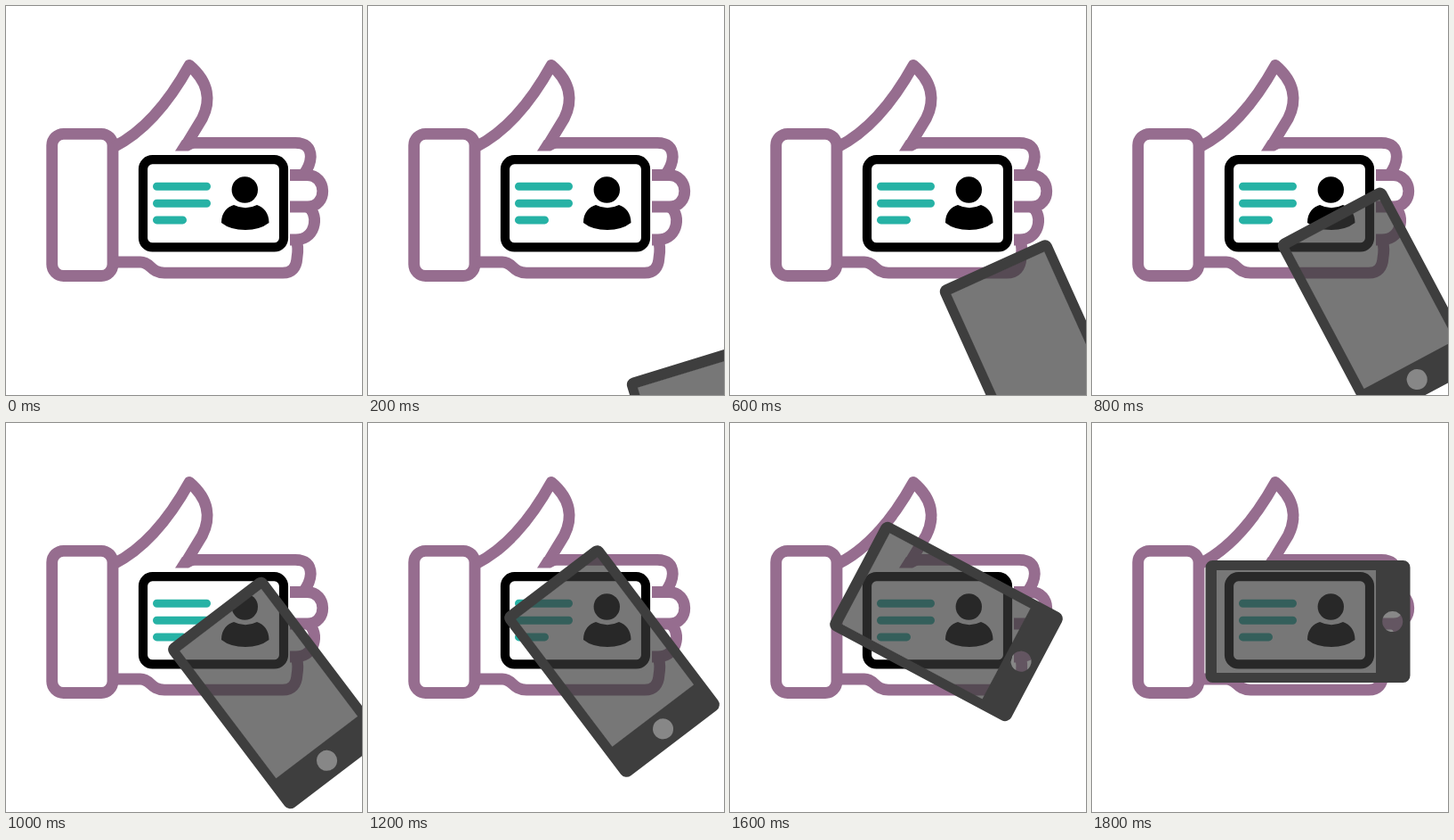
An HTML page that plays this animation: 400 by 436 pixels, repeating every 2000 ms.

```html
<!DOCTYPE html>
<html lang="en">
<head>
<meta charset="utf-8">
<title>Card scan</title>
<style>
html, body { margin: 0; width: 100%; height: 100%; overflow: hidden; background: #fff; }
svg { display: block; width: 100vw; height: 100vh; }
</style>
</head>
<body>
<svg viewBox="0 0 400 436">
  <g id="hand" fill="none" stroke="#966d8f" stroke-width="12.8" stroke-linejoin="round">
    <rect x="51.7" y="143.300" width="68.300" height="159.200" rx="13"/>
    <path d="M121 158C155 141 184 106 206 66.500C229 86 230 107 220.500 126L201 158"/>
    <path d="M190 162.600L198 150H212V159L205 162.600Z" fill="#966d8f" stroke="none"/>
    <path d="M204 153.400H325Q342 153.400 342.300 169Q342 179 334 189.500"/>
    <path d="M319 189.500H338C361.500 189.500 361.500 225 339 225H319"/>
    <path d="M338 225C351 229 351 261 326 262H319"/>
    <path d="M326 262Q329 270 327 282Q326 299 311 299.200H178C162 299 163 287 151 287H121"/>
  </g>
  <g id="card">
    <rect x="154" y="172.200" width="158" height="98.200" rx="10.500" fill="#fff" stroke="#000" stroke-width="10.200"/>
    <path d="M169.500 202.300H225.500M169.500 221.200H225.500M169.500 239.900H198.500"
      stroke="#26b2a5" stroke-width="9" stroke-linecap="round"/>
    <circle cx="268.300" cy="206" r="14.700"/>
    <path d="M242 243C242 231 249 225 256 223Q269 229.500 282 223C290 226 295.500 232 295.500 243Q285 251 269 251Q252 251 242 243Z"/>
  </g>
  <g id="phone">
    <rect x="-103" y="-58" width="180" height="116" fill="#3a3a3a" fill-opacity=".69"/>
    <circle cx="95.200" r="12" fill="#4a4a4a" fill-opacity=".66"/>
    <path fill="#3e3e3e" fill-rule="evenodd" d="M-107-68.500H107A8 8 0 0 1 115-60.500V60.500A8 8 0 0 1 107 68.500H-107A8 8 0 0 1-115 60.500V-60.500A8 8 0 0 1-107-68.500Z
      M-102.500-57.500V57.500H76.500V-57.500Z M83.700 0A11.500 11.500 0 0 0 106.700 0A11.500 11.500 0 0 0 83.700 0Z"/>
  </g>
</svg>
<script>
const LOOP = 2000, STEP = 200;
const phone = document.getElementById('phone');

// The phone glides in, then alternates between sliding and turning.
const keys = [
  { step: 1, x: 388, y: 509, tilt: 73 },
  { step: 4, x: 320.5, y: 334.5, tilt: 62 },
  { step: 5, x: 303, y: 302.5, tilt: 52.8 },
  { step: 6, x: 274, y: 267, tilt: 52.8 },
  { step: 7, x: 266, y: 255.5, tilt: 31 },
  { step: 8, x: 243, y: 222.5, tilt: 28 },
  { step: 9, x: 242.5, y: 222.5, tilt: 0 }
];

const lerp = (a, b, k) => a + (b - a) * k;

function poseAt(step) {
  const i = Math.max(1, keys.findIndex(key => key.step >= step));
  const a = keys[i - 1], b = keys[i];
  const k = (step - a.step) / (b.step - a.step);
  return ['x', 'y', 'tilt'].map(name => lerp(a[name], b[name], k));
}

function draw(time) {
  const step = Math.floor((time % LOOP) / STEP);
  const [x, y, tilt] = poseAt(step);
  phone.setAttribute('visibility', step ? 'visible' : 'hidden');
  phone.setAttribute('transform', `translate(${x} ${y}) rotate(${tilt})`);
}

function tick() {
  draw(performance.now());
  requestAnimationFrame(tick);
}
tick();
</script>
</body>
</html>
```
